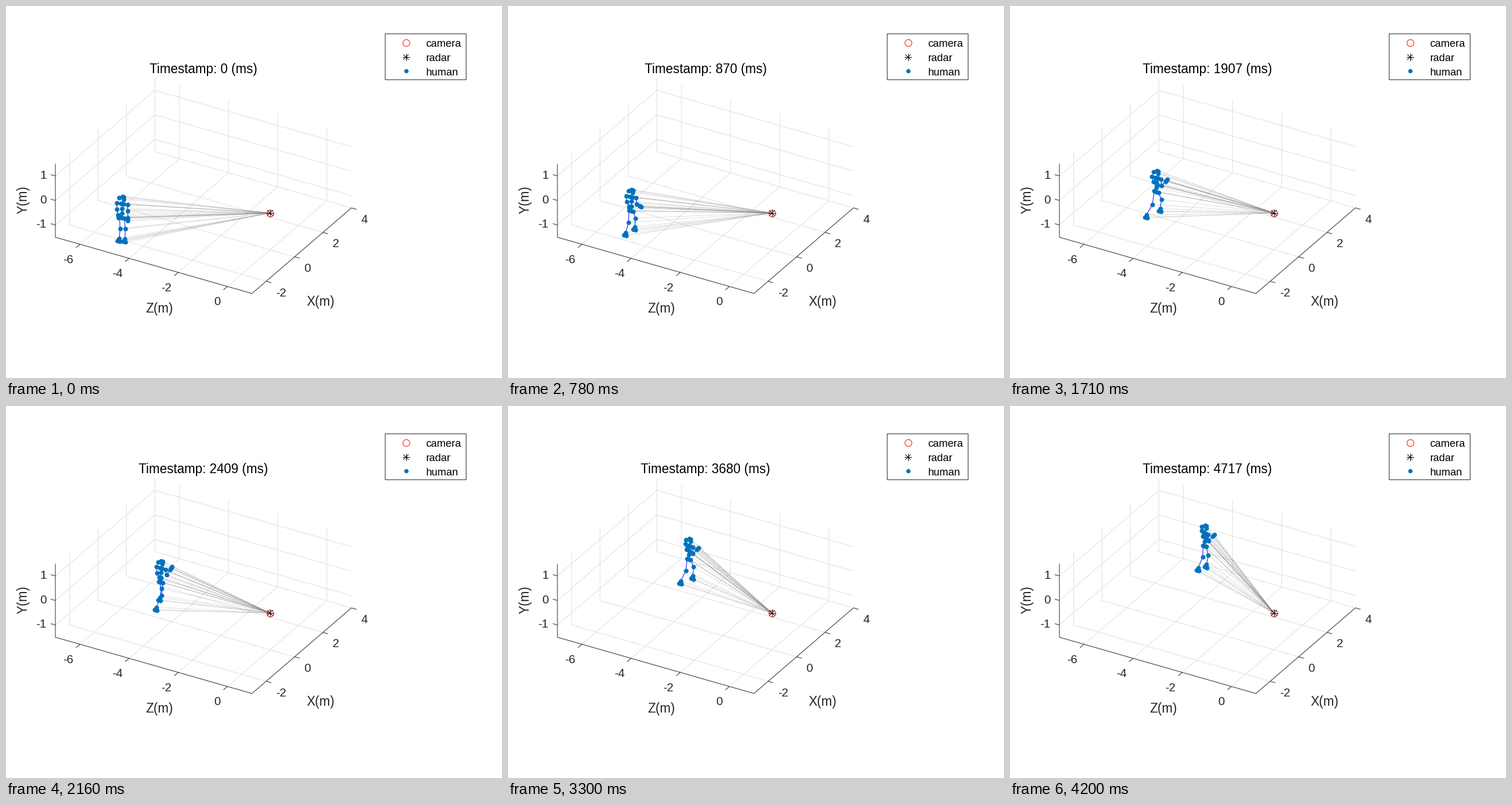
These frames come from a looping animation (864x648 px, 4230 ms). A matplotlib script:

```python
import math

import matplotlib.pyplot as plt
import numpy as np
from matplotlib.animation import FuncAnimation
from matplotlib.collections import LineCollection
from matplotlib.patches import Rectangle

plt.rcParams["font.family"] = "Liberation Sans"
W, H, FRAMES, STEP = 864, 648, 141, 30
INK, GRID, BLUE = "#262626", "#dfdfdf", "#0072bd"

fig = plt.figure(figsize=(W / 72, H / 72), dpi=72, facecolor="white")
ax = fig.add_axes([0, 0, 1, 1])
ax.set_xlim(0, W)
ax.set_ylim(H, 0)
ax.axis("off")

# --- static scene: one metre along each axis, in pixels ----------------------
ORIGIN = np.array([459.9, 360.6])
AHEAD = np.array([24.75, -21.3])
DOWN = np.array([0, 42.7])
DEPTH = np.array([42.8, 12.25])
X_LO, X_HI, Y_LO, Y_HI, Z_LO, Z_HI = -3, 4, -1.5, 1.5, -7, 1


def project(x, y, z):
    return ORIGIN + x * AHEAD - y * DOWN + z * DEPTH


def path(color, *points):
    ax.plot(*np.transpose(points), color=color, lw=1,
            solid_capstyle="butt", zorder=1)


def label(x, y, s, size=20.5, color=INK, **kw):
    kw = {"ha": "center", "va": "baseline", **kw}
    return ax.text(x, y, s, fontsize=size, color=color, zorder=6, **kw)


def draw_axes():
    xs, ys, zs = range(-2, 5, 2), range(-1, 2), range(-6, 1, 2)
    for x in xs:
        path(GRID, project(x, Y_HI, Z_LO), project(x, Y_LO, Z_LO),
             project(x, Y_LO, Z_HI))
    for z in zs:
        path(GRID, project(X_HI, Y_HI, z), project(X_HI, Y_LO, z),
             project(X_LO, Y_LO, z))
    for y in ys:
        path(GRID, project(X_LO, y, Z_LO), project(X_HI, y, Z_LO),
             project(X_HI, y, Z_HI))

    path(INK, project(X_LO, Y_HI, Z_LO), project(X_LO, Y_LO, Z_LO),
         project(X_LO, Y_LO, Z_HI), project(X_HI, Y_LO, Z_HI))
    for z in zs:
        p = project(X_LO, Y_LO, z)
        path(INK, p, p - 0.28 * AHEAD)
        label(p[0] - 11.5, p[1] + 32.5, str(z), ha="right")
    for x in xs:
        p = project(x, Y_LO, Z_HI)
        path(INK, p, p + 0.21 * DEPTH)
        label(p[0] + 16.5, p[1] + 26, str(x), ha="left")
    for y in ys:
        p = project(X_LO, y, Z_LO)
        path(INK, p, p - 0.19 * DEPTH)
        label(70.5, p[1] + 5, str(y), ha="right")

    label(267, 534, "Z(m)", 22.6)
    label(548, 522, "X(m)", 22.6)
    label(41, 338, "Y(m)", 22.6, rotation=90, ha="right", va="center")


def ring(x, y):
    ax.plot(x, y, "o", ms=12, mfc="none", mec="red", mew=1, zorder=8)


def star(x, y):
    for dx, dy in ((6, 0), (0, 6), (4.3, 4.3), (4.3, -4.3)):
        ax.plot([x - dx, x + dx], [y - dy, y + dy], "k", lw=1, zorder=9)


def draw_legend():
    ax.add_patch(Rectangle((659.5, 47.5), 141, 80, fc="white", ec=INK, lw=1))
    ring(696.7, 64)
    star(696.7, 89)
    ax.plot(696.7, 113, "o", ms=7.5, color=BLUE, mew=0)
    for i, s in enumerate(("camera", "radar", "human")):
        label(731.5, 71 + 25 * i, s, 18.5, "black", ha="left")


draw_axes()
draw_legend()
ring(*ORIGIN)
star(*ORIGIN)

# --- walker -----------------------------------------------------------------
# Where the pelvis is on the stage: time, x, y.
ROUTE = np.array([(0, 202, 369), (14, 205, 366.5), (37, 227, 345),
                  (57, 255, 323.5), (87, 284, 290), (110, 315, 267),
                  (140, 339, 244), (150, 347, 236)])
GAIT = 27       # frames per stride
STANCE = 0.57   # share of a stride with the foot on the floor
LAND = {-1: 17, 1: 2}   # first landing of the right and left foot
FACE = [(-5.5, 2), (0, 0), (2.5, 1), (2, 5)]


def smooth(u):
    u = min(max(u, 0), 1)
    return u * u * (3 - 2 * u)


def pelvis_at(n):
    """Cubic curve through the route points."""
    t, p = ROUTE[:, 0], ROUTE[:, 1:]
    n = min(max(n, 0), t[-1])
    m = np.gradient(p, t, axis=0)
    i = min(np.searchsorted(t, n, "right"), len(t) - 1) - 1
    h = t[i + 1] - t[i]
    u = (n - t[i]) / h
    return (p[i] + (p[i + 1] - p[i]) * smooth(u)
            + h * u * (1 - u) * (m[i] * (1 - u) - m[i + 1] * u))


def bone(angle, length):
    """Limb of a length in metres, swung forward from hanging down."""
    return length * (math.cos(angle) * DOWN + math.sin(angle) * AHEAD)


def leg(side, n, hip, across, walk):
    """The foot waits on the route, then catches up with the body."""
    stride, u = divmod((n - LAND[side]) / GAIT, 1)
    swing = max(0, (u - STANCE) / (1 - STANCE))
    rise = 13 * walk * math.sin(math.pi * swing)
    when = LAND[side] + 3.5 + GAIT * (stride + smooth(swing))
    ankle = pelvis_at(when) + side * across + (0, 36.5 - 5.5 * walk - rise)
    reach = ankle[0] - hip[0]
    knee = (hip + ankle) / 2 + (1 + 2.5 * walk,
                                1 - 2 * walk - 0.25 * reach - 0.2 * rise)
    return [hip, knee, ankle, ankle + (-3, 4), ankle + (1, 5.5)]


def arm(side, n, shoulder, walk):
    """Both arms swing; the left forearm is held up while walking."""
    swing = walk * math.cos(math.tau * (n - 57) / GAIT)
    upper = 0.05 + 0.15 * walk - 0.12 * side * swing
    bend = 1.6 * walk if side > 0 else 0.2 + 0.3 * walk
    elbow = shoulder + bone(upper, 0.27)
    fore = bone(upper + bend, 0.35)
    return [shoulder, elbow] + [elbow + k * fore for k in (0.8, 1, 1.15)]


def pose(n):
    """Joints and bone chains of the walker."""
    walk = smooth((n - 14) / 24)
    turn = n / FRAMES
    across = np.array([9.3 - 3.5 * turn, 1.5 + 1.8 * turn])
    pelvis = pelvis_at(n)
    head = pelvis + (0.5, -37.5 + 1.5 * turn)
    face = [head + p for p in FACE]
    neck, chest, navel = (head + k * (pelvis - head)
                          for k in (0.35, 0.56, 0.79))
    collar = [neck - 0.3 * across, neck + 0.3 * across]
    sides = (-1, 1)
    arms = [arm(s, n, neck + s * across, walk) for s in sides]
    legs = [leg(s, n, pelvis + 0.45 * s * across, 0.5 * across, walk)
            for s in sides]
    spine = [chest, navel, pelvis]
    joints = face + collar + spine + sum(arms + legs, [])
    bones = [face, [face[-1], neck] + spine,
             [arms[0][0], *collar, arms[1][0]],
             [legs[0][0], pelvis, legs[1][0]]] + arms + legs
    return np.array(joints), [np.array(b) for b in bones]


rays = LineCollection([], colors="#757575", linewidths=0.7,
                      linestyles=[(0, (1.4, 2.9))], zorder=3)
limbs = LineCollection([], colors="#0000ff", linewidths=1, zorder=4)
ax.add_collection(rays, autolim=False)
ax.add_collection(limbs, autolim=False)
dots, = ax.plot([], [], "o", ms=8, color=BLUE, mew=0, zorder=5)
title = label(344, 117, "", 22.6, "black")


def timestamp(n):
    return math.ceil(33.4535 * (n + (n >= 125)))


def update(n):
    joints, bones = pose(n)
    rays.set_segments([np.array([j, ORIGIN]) for j in joints])
    limbs.set_segments(bones)
    dots.set_data(joints[:, 0], joints[:, 1])
    title.set_text(f"Timestamp: {timestamp(n)} (ms)")
    return rays, limbs, dots, title


anim = FuncAnimation(fig, update, frames=FRAMES, interval=STEP,
                     repeat=True, repeat_delay=0, blit=False)
plt.show()
```
